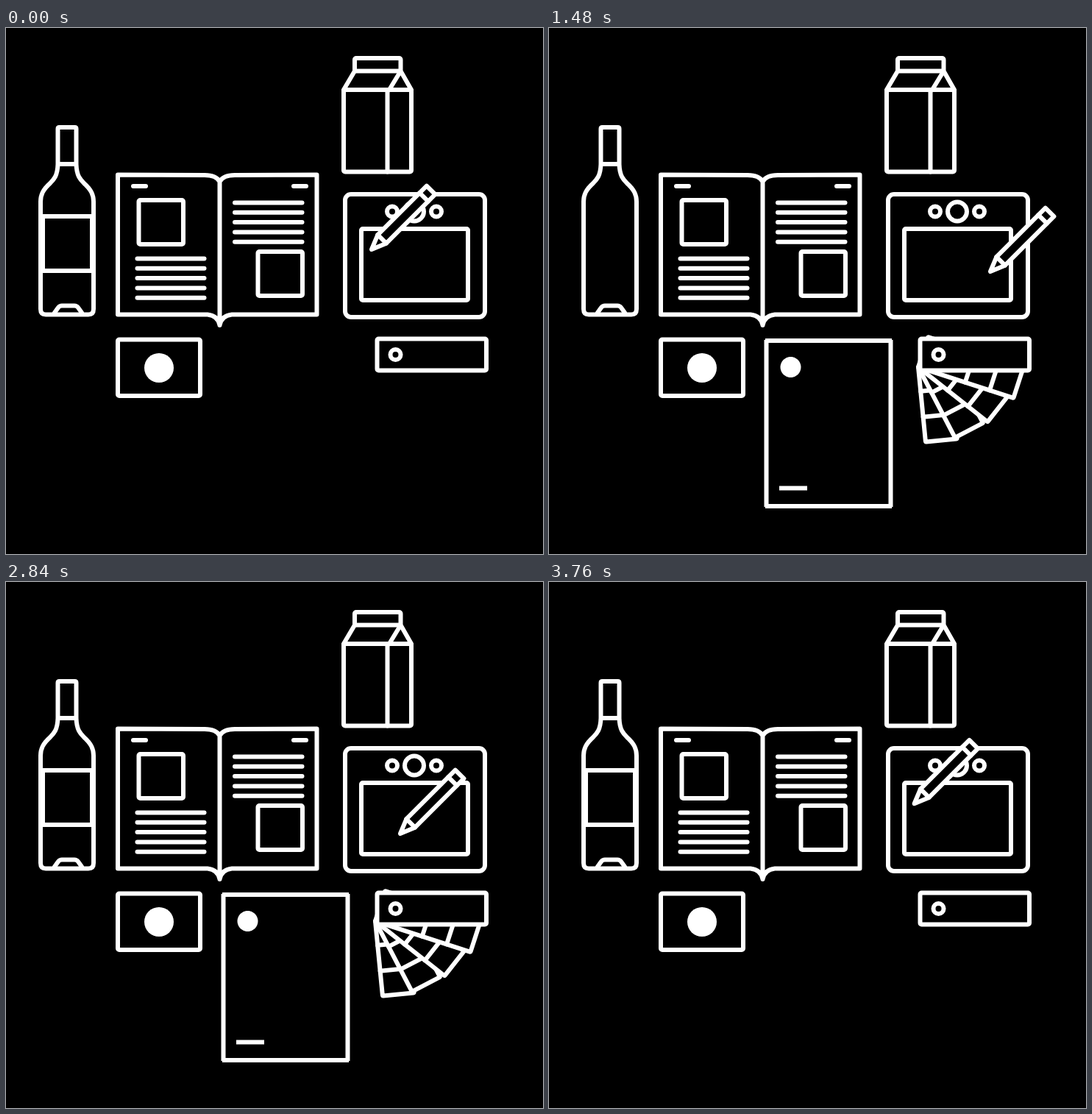
Animation of 730 by 715 pixels, one loop 3.8 s. Source, as an HTML page with a canvas:

```html
<!DOCTYPE html>
<html lang="en">
<head>
<meta charset="utf-8">
<title>Desk icons</title>
<style>
html, body { margin: 0; width: 100%; height: 100%; overflow: hidden; background: #000; }
canvas { display: block; }
</style>
</head>
<body>
<canvas id="stage" width="730" height="715"></canvas>
<script>
const c = document.getElementById('stage').getContext('2d');
const LOOP = 3800, STEP = 40, TAU = Math.PI * 2;

// [time, x, y] of the pencil tip
const TIP = [
  [0, 497, 301], [240, 506, 312], [520, 531, 315], [760, 564, 300], [960, 592, 301],
  [1140, 605, 308], [1320, 605, 323], [1480, 600, 331], [1580, 592, 330], [1680, 586, 323],
  [1800, 583, 326], [1960, 577, 337], [2080, 571, 339], [2200, 563, 337], [2400, 555, 339],
  [2600, 546, 342], [2840, 536, 342], [3100, 518, 332], [3360, 499, 318], [3440, 496, 309],
  [3560, 495, 303], [3800, 497, 301]
];
// [angle, length] of the swatch blades, lowest first
const BLADES = [[84.4, 102], [62.5, 108], [38.3, 120], [18, 136]];

const span = (t, a, b) => Math.min(1, Math.max(0, (t - a) / (b - a)));
const ease = k => k * k * (3 - 2 * k);
const pulse = (t, a, b, d, e) => ease(span(t, a, b)) - ease(span(t, d, e));

function spline(keys, t) {
  let i = 0;
  while (i < keys.length - 2 && t >= keys[i + 1][0]) i++;
  const a = keys[i], b = keys[i + 1], h = b[0] - a[0], k = (t - a[0]) / h;
  const slope = (j, n) => {
    const p = keys[Math.max(0, j - 1)], q = keys[Math.min(keys.length - 1, j + 1)];
    return (q[n] - p[n]) / (q[0] - p[0]) * h;
  };
  return [1, 2].map(n =>
    a[n] * (1 + 2 * k) * (1 - k) ** 2 + slope(i, n) * k * (1 - k) ** 2 +
    b[n] * k * k * (3 - 2 * k) + slope(i + 1, n) * k * k * (k - 1));
}

function box(x, y, w, h, r = 2) {
  c.beginPath();
  c.roundRect(x, y, w, h, r);
  c.fill();
  c.stroke();
}
function ring(x, y, r) {
  c.beginPath();
  c.arc(x, y, r, 0, TAU);
  c.stroke();
}
function disc(x, y, r) {
  c.fillStyle = '#fff';
  c.beginPath();
  c.arc(x, y, r, 0, TAU);
  c.fill();
  c.fillStyle = '#000';
}
function line(...p) {
  c.beginPath();
  for (let i = 0; i < p.length; i += 2) c.lineTo(p[i], p[i + 1]);
  c.stroke();
}
const path = d => c.stroke(new Path2D(d));

function bottle(t) {
  const shift = t < 1400 ? -72 * ease(span(t, 480, 1040)) : 72 * (1 - ease(span(t, 1740, 2180)));
  c.save();
  c.beginPath();
  c.rect(49, 250, 68, 86);
  c.clip();
  c.strokeRect(50 + shift, 256, 67, 74);
  c.restore();
  path('M70.5 185V137Q70.5 135 72.5 135H93.5Q95.5 135 95.5 137V185C96 201 101 206 106 211' +
    'C116 220 119 227 119 236V382Q119 389.5 112 389.5H54Q47 389.5 47 382V236' +
    'C47 227 50 220 60 211C65 206 70 201 70.5 185H95.5');
  path('M66 387L71 380Q73 377.5 76 377.5H93Q96 377.5 98 380L103 387');
}

function book() {
  path('M290.5 209Q286 200 270 200L152 199.5V389.5H274Q288 391 290.5 404Q293 391 307 389.5' +
    'H422.5V199.5L311 200Q295 200 290.5 209V404');
  line(173, 215, 190, 215);
  line(391, 215, 408, 215);
  box(180.5, 234, 60.5, 60);
  box(342.5, 304, 60.5, 60);
  for (let i = 0; i < 5; i++) {
    const y = 237.5 + i * 13.3;
    line(311, y, 402.5, y);
    line(178.5, y + 76, 269.5, y + 76);
  }
}

function carton() {
  box(474, 41, 62.5, 17.5, 2);
  box(459, 84, 92, 111.5, 2);
  line(474, 58.5, 459, 84);
  line(551, 84, 536.5, 58.5, 521, 84);
  line(518.5, 84, 518.5, 195.5);
}

function tablet() {
  box(461, 226, 190, 167, 8);
  box(483, 273, 145, 97, 2);
  ring(525, 249.5, 7);
  ring(555, 249.5, 13);
  ring(585, 249.5, 7);
}

function pencil(t) {
  const [x, y] = spline(TIP, t);
  c.save();
  c.translate(x, y);
  c.rotate(-Math.PI / 4);
  c.beginPath();
  c.moveTo(0, 0);
  c.lineTo(20, -8.2);
  c.lineTo(114, -8.2);
  c.lineTo(114, 8.2);
  c.lineTo(20, 8.2);
  c.closePath();
  c.fill();
  c.stroke();
  line(20, -8.2, 20, 8.2);
  line(100.5, -8.2, 100.5, 8.2);
  c.restore();
}

function swatches(t) {
  const tilt = -8.1 * (ease(span(t, 300, 480)) - ease(span(t, 560, 800)) +
    ease(span(t, 3140, 3360)) - ease(span(t, 3480, 3660)));
  const open = pulse(t, 580, 1080, 2880, 3360);
  c.save();
  c.translate(502, 461);
  if (open > 0) {
    for (const [angle, len] of BLADES) {
      c.save();
      c.rotate((tilt + (angle - tilt) * open) * TAU / 360);
      box(0, -43, len, 43, 1);
      for (const d of [34, 69]) line(len - d, -43, len - d, 0);
      c.restore();
    }
  }
  c.rotate(tilt * TAU / 360);
  box(2.5, -38.5, 148.5, 43, 2);
  ring(27.5, -17, 7);
  c.restore();
}

// Page curl: everything beyond the contact line wraps round a cylinder
function curl(depth) {
  const R = 37.5, a = (53.2 + 0.097 * depth) * TAU / 360;
  const nx = Math.cos(a), ny = Math.sin(a);
  return (x, y) => {
    const s = depth - (x - 295) * nx - (y - 425) * ny;
    if (s <= 0) return [x, y];
    const move = s - (s < Math.PI * R ? R * Math.sin(s / R) : Math.PI * R - s);
    return [x + move * nx, y + move * ny];
  };
}

function sheet(t) {
  if (t < 45 || t > 3750) return;
  const depth = 300 * (1 - span(t, 45, 776) + span(t, 3020, 3750));
  const bend = curl(depth), N = 48;
  const shape = (n, at) => {
    c.beginPath();
    for (let i = 0; i < n; i++) c.lineTo(...bend(...at(i)));
    c.fill();
  };
  const bar = (x, y, w, h) => shape(N * 4, i => {
    const k = (i % N) / N;
    return [[x + w * k, y], [x + w, y + h * k], [x + w - w * k, y + h], [x, y + h - h * k]][Math.floor(i / N)];
  });
  c.save();
  c.beginPath();
  c.rect(291, 420, 182, 235);
  c.clip();
  c.fillStyle = '#fff';
  bar(294, 422, 172, 6);
  bar(294, 647, 172, 6);
  bar(292.5, 424, 6, 227);
  bar(461.5, 424, 6, 227);
  bar(313, 622.5, 38, 6);
  shape(N, i => [328.5 + 14 * Math.cos(i / N * TAU), 461 + 14 * Math.sin(i / N * TAU)]);
  c.restore();
}

function draw(t) {
  c.fillStyle = '#000';
  c.fillRect(0, 0, 730, 715);
  c.strokeStyle = '#fff';
  c.lineWidth = 6;
  c.lineCap = c.lineJoin = 'round';
  bottle(t);
  book();
  carton();
  tablet();
  box(152, 423.5, 112, 76.5);
  disc(208, 462, 20);
  swatches(t);
  sheet(t);
  pencil(t);
}

const start = performance.now();
function tick() {
  const t = (performance.now() - start) % LOOP;
  draw(Math.floor(t / STEP) * STEP);
  requestAnimationFrame(tick);
}
tick();
</script>
</body>
</html>
```
